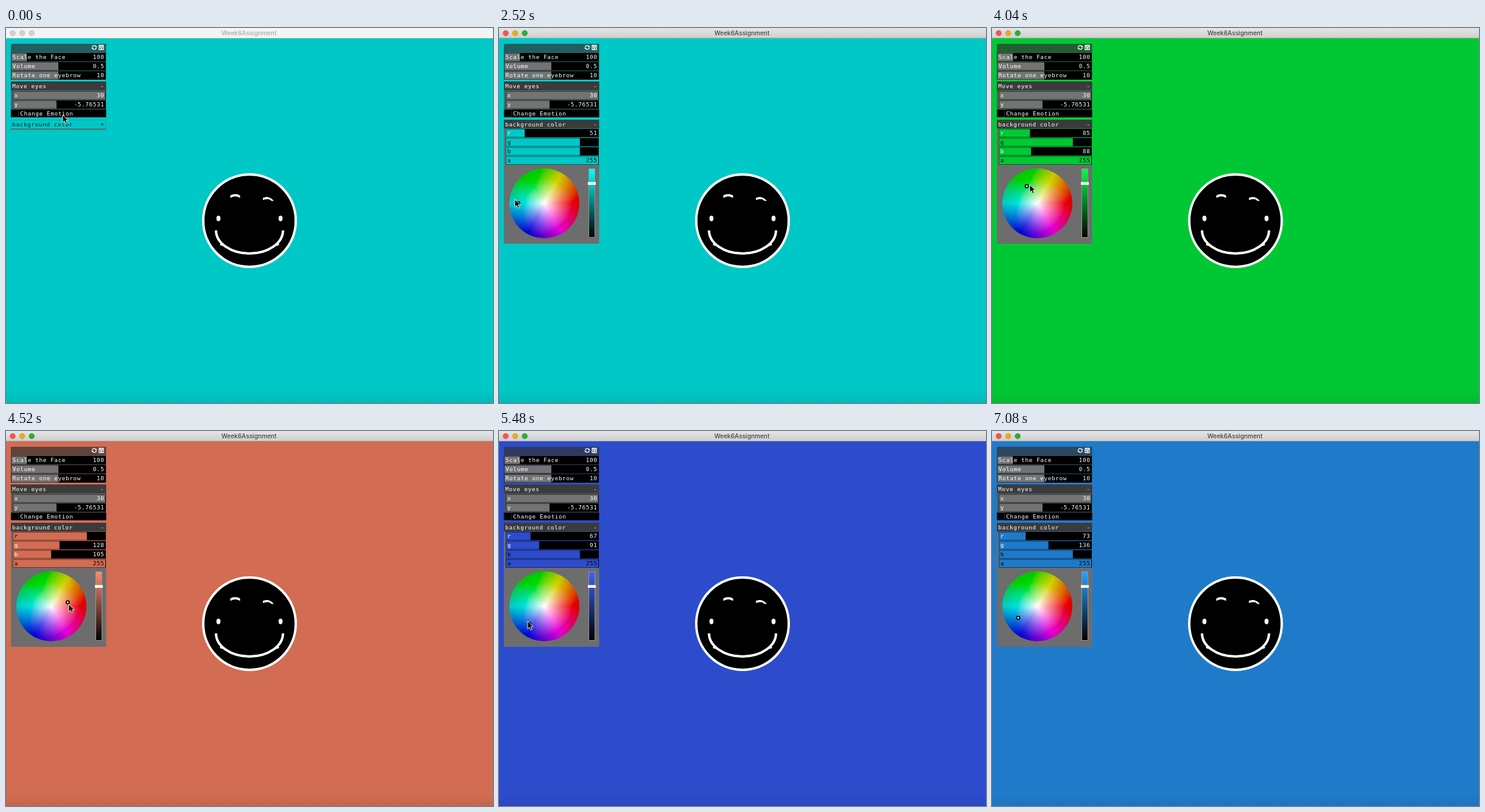
An HTML page with a canvas that plays this animation: 800x617 px, repeating every 7120 ms.

```html
<!DOCTYPE html>
<html lang="en">
<head>
<meta charset="utf-8">
<title>Week6Assignment</title>
<style>
html, body { margin: 0; width: 100%; height: 100%; overflow: hidden; }
svg { display: block; width: 100vw; height: 100vh; }
text { font: 9.4px "DejaVu Sans Mono", monospace; letter-spacing: .6px; white-space: pre; }
.title { font: 500 10.1px Inter, Roboto, sans-serif; letter-spacing: 0; text-anchor: middle; }
.end { text-anchor: end; }
.bg { fill: var(--bg); }
canvas { display: block; border-radius: 50%; }
</style>
</head>
<body>
<svg id="stage" viewBox="0 0 800 617" preserveAspectRatio="none">
  <defs>
    <linearGradient id="chrome" x2="0" y2="1">
      <stop stop-color="#e6e6e6"/><stop offset="1" stop-color="#cecece"/>
    </linearGradient>
    <linearGradient id="shade" x2="0" y2="1">
      <stop stop-opacity="0"/><stop offset="1" stop-opacity=".06"/>
    </linearGradient>
    <linearGradient id="value" x2="0" y2="1">
      <stop id="bright"/><stop offset="1" stop-color="#000"/>
    </linearGradient>
  </defs>
  <rect class="bg" width="800" height="617"/>
  <rect y="595" width="800" height="22" fill="url(#shade)"/>
  <g id="titlebar"></g>

  <g fill="#fff">
    <circle cx="400" cy="317" r="76" fill="#000" stroke="#fff" stroke-width="4"/>
    <path d="M345 333A55 38 0 0 0 455 333M352 355l4 2M448 355l-4 2" fill="none" stroke="#fff" stroke-width="4"/>
    <path d="M368.500 279.500V275.500Q376.500 271 384.500 275.500V279.500Q376.500 274.500 368.500 279.500Z"/>
    <path d="M422 283V279.500Q430 275.500 437 281.500L440 284.500H436L433 282Q428 280.500 422 283Z"/>
    <ellipse cx="349" cy="313.300" rx="3.300" ry="4.600"/>
    <ellipse cx="451" cy="313.300" rx="3.300" ry="4.600"/>
  </g>

  <g id="panel"></g>
  <g id="picker">
    <rect x="8" y="225" width="156.500" height="130" fill="#6d6d6d"/>
    <rect x="8" y="166" width="3" height="60" fill="#6d6d6d"/>
    <g id="channels"></g>
    <foreignObject x="17" y="231" width="115" height="115"><canvas id="wheel" width="115" height="115"></canvas></foreignObject>
    <rect x="147.500" y="231.500" width="10" height="113" fill="url(#value)" stroke="#959595"/>
    <rect x="146" y="253.500" width="13" height="4.500" fill="#fff"/>
    <circle id="marker" r="2.500" fill="#fff" stroke="#000" stroke-width="1.800"/>
  </g>
  <path id="cursor" d="M0 0V12.500L3 9.800L5 14.500L7.300 13.500L5.300 9H9.300Z" fill="#000" stroke="#fff" stroke-width=".9"/>
</svg>
<script>
const LOOP = 7120, STEP = 40, FOCUS = 1100, OPEN = 2200;
const byId = id => document.getElementById(id);

const rect = (x, y, w, h, fill) => `<rect x="${x}" y="${y}" width="${w}" height="${h}" fill="${fill}"/>`;
const label = (x, y, text, fill = "#fff", cls = "") =>
  `<text x="${x}" y="${y}" class="${cls}" fill="${fill}">${text}</text>`;

function slider(x, y, name, value, part, fill = "#737373", ink = "#fff") {
  const w = 163 - x;
  return rect(x - .5, y, w + 1.5, 14, "#000") + rect(x, y + .5, w * part, 13, fill) +
    label(x + 1.7, y + 10.4, name, ink) + label(161.6, y + 10.4, value, ink, "end");
}

function header(y, name, sign, fill = "#3b3b3b", ink = "#fff") {
  return rect(8, y, 156.5, 14.5, fill) + label(10.2, y + 11, name, ink) +
    label(161.6, y + 11, sign, ink, "end");
}

function panel(open) {
  return rect(8, 26, 156.5, 14, "rgba(50,50,50,.7)") +
    `<g fill="none" stroke="#fff" stroke-width="1.3">
      <path d="M141.500 31.500a3.500 3.500 0 0 1 6-1.500M148.500 32.500a3.500 3.500 0 0 1-6 1.500"/>
      <path d="M146 31.500h4l-2-2.500zM140 32.500h4l-2 2.500z" fill="#fff" stroke="none"/>
      <path d="M153 28.500h7v7h-7zM155 29v2.500h3V29M155 33.500h3"/>
    </g>` +
    rect(8, 40, 156.5, 45, "rgba(50,50,50,.6)") +
    slider(9, 41, "Scale the Face", "100", .165) +
    slider(9, 56, "Volume", "0.5", .5) +
    slider(9, 71, "Rotate one eyebrow", "10", .5) +
    rect(8, 88, 156.5, 59, "rgba(85,85,85,.8)") +
    header(88, "Move eyes", "-") +
    slider(12, 104, "x", "30", 1) +
    slider(12, 119, "y", "-5.76531", .47) +
    rect(8, 134, 156.5, 13, "#000") +
    `<rect x="9.500" y="134.500" width="11" height="12" fill="none" stroke="#222"/>` +
    label(23.2, 144, "Change Emotion") +
    (open ? header(151, "background color", "-")
          : header(151, "background color", "+", "var(--bg)", "#002020") +
            `<rect x="8.500" y="151.500" width="155.500" height="14" fill="none" stroke="#555" stroke-opacity=".5" stroke-dasharray="1 1"/>` +
            rect(8, 165.5, 156.5, 2, "#606c6c"));
}

function titlebar(active) {
  const lights = active ? ["#f4554d", "#e5ac20", "#2aad38"] : ["#d0d0d0", "#d0d0d0", "#d0d0d0"];
  return rect(0, 0, 800, 17, active ? "url(#chrome)" : "#f4f4f4") +
    rect(0, 16, 800, 1, active ? "#aaa" : "#d8d8d8") +
    lights.map((c, i) => `<circle cx="${11 + 15.6 * i}" cy="8.500" r="4.700" fill="${c}" stroke="#000" stroke-opacity=".12" stroke-width=".6"/>`).join("") +
    label(399, 12.3, "Week6Assignment", active ? "#444" : "#aaa", "title");
}

// Rows of [time, a, b]; eased when smooth, otherwise linear
function along(keys, t, smooth) {
  const i = keys.findIndex(k => k[0] > t);
  if (i === 0) return keys[0].slice(1);
  if (i < 0) return keys[keys.length - 1].slice(1);
  const [t0, a0, b0] = keys[i - 1], [t1, a1, b1] = keys[i];
  let u = (t - t0) / (t1 - t0);
  if (smooth) u = u * u * (3 - 2 * u);
  return [a0 + (a1 - a0) * u, b0 + (b1 - b0) * u];
}

const cursorPath = [
  [0, 93, 143], [160, 93, 143], [800, 154, 155], [2200, 154, 155],
  [2500, 26, 282], [3640, 26, 282], [4040, 62, 258], [4300, 94, 260],
  [4520, 103, 285], [4840, 110, 309], [5120, 82, 325], [5480, 47, 313],
  [5840, 40, 303], [6040, 40, 303], [6440, 90, -20]
];
// Hue in degrees and saturation of the picked colour
const huePath = [
  [3660, 180, .75], [4040, 121.5, .583], [4320, 60, .52], [4520, 14, .485],
  [4840, -32, .66], [5120, -70, .73], [5480, -130.5, .67], [5880, -149, .642]
];

function hsv(hue, sat, val) {
  return [5, 3, 1].map(n => {
    const k = (n + hue / 60 + 12) % 6;
    return val * (1 - sat * Math.max(0, Math.min(k, 4 - k, 1)));
  });
}

// Wide-gamut screen colour as it appears in sRGB
function onScreen(rgb) {
  const [r, g, b] = rgb.map(v => v <= .04045 ? v / 12.92 : ((v + .055) / 1.055) ** 2.4);
  const mixed = [1.225 * r - .225 * g, 1.042 * g - .042 * r, 1.098 * b - .0786 * g - .0196 * r];
  return mixed.map(v => {
    const c = Math.min(1, Math.max(0, v)) ** 1.18;
    return Math.round(255 * (c <= .0031308 ? 12.92 * c : 1.055 * c ** (1 / 2.4) - .055));
  });
}
const css = rgb => `rgb(${onScreen(rgb)})`;

function paintWheel() {
  const ctx = byId("wheel").getContext("2d"), size = 115, mid = size / 2;
  const image = ctx.createImageData(size, size);
  for (let y = 0; y < size; y++) {
    for (let x = 0; x < size; x++) {
      const dx = x + .5 - mid, dy = mid - y - .5;
      const sat = Math.min(1, Math.hypot(dx, dy) / mid);
      const rgb = hsv(Math.atan2(dy, dx) * 180 / Math.PI, sat, 1 - .2 * sat);
      image.data.set([...onScreen(rgb), 255], 4 * (y * size + x));
    }
  }
  ctx.putImageData(image, 0, 0);
}

let wasActive, wasOpen;
function draw(t) {
  const active = t >= FOCUS, open = t >= OPEN;
  if (active !== wasActive) byId("titlebar").innerHTML = titlebar(active);
  if (open !== wasOpen) byId("panel").innerHTML = panel(open);
  wasActive = active;
  wasOpen = open;

  const [hue, sat] = along(huePath, t);
  const rgb = hsv(hue, sat, .8);
  byId("stage").style.setProperty("--bg", css(rgb));
  byId("bright").setAttribute("stop-color", css(hsv(hue, sat, 1)));

  byId("picker").style.display = open ? "" : "none";
  byId("channels").innerHTML = [...rgb, 1].map((v, i) => {
    const n = Math.round(v * 255);
    return slider(12, 166 + 15 * i, "rgba"[i], n, v, "var(--bg)", n > 195 ? "#000" : "#fff");
  }).join("");

  const angle = hue * Math.PI / 180;
  byId("marker").setAttribute("cx", 74.5 + 57 * sat * Math.cos(angle));
  byId("marker").setAttribute("cy", 288.5 - 57 * sat * Math.sin(angle));
  byId("cursor").setAttribute("transform", `translate(${along(cursorPath, t, t < 3640 || t > 6040)})`);
}

paintWheel();
const start = performance.now();
function tick() {
  const t = (performance.now() - start) % LOOP;
  draw(Math.floor(t / STEP) * STEP);
  requestAnimationFrame(tick);
}
tick();
</script>
</body>
</html>
```
